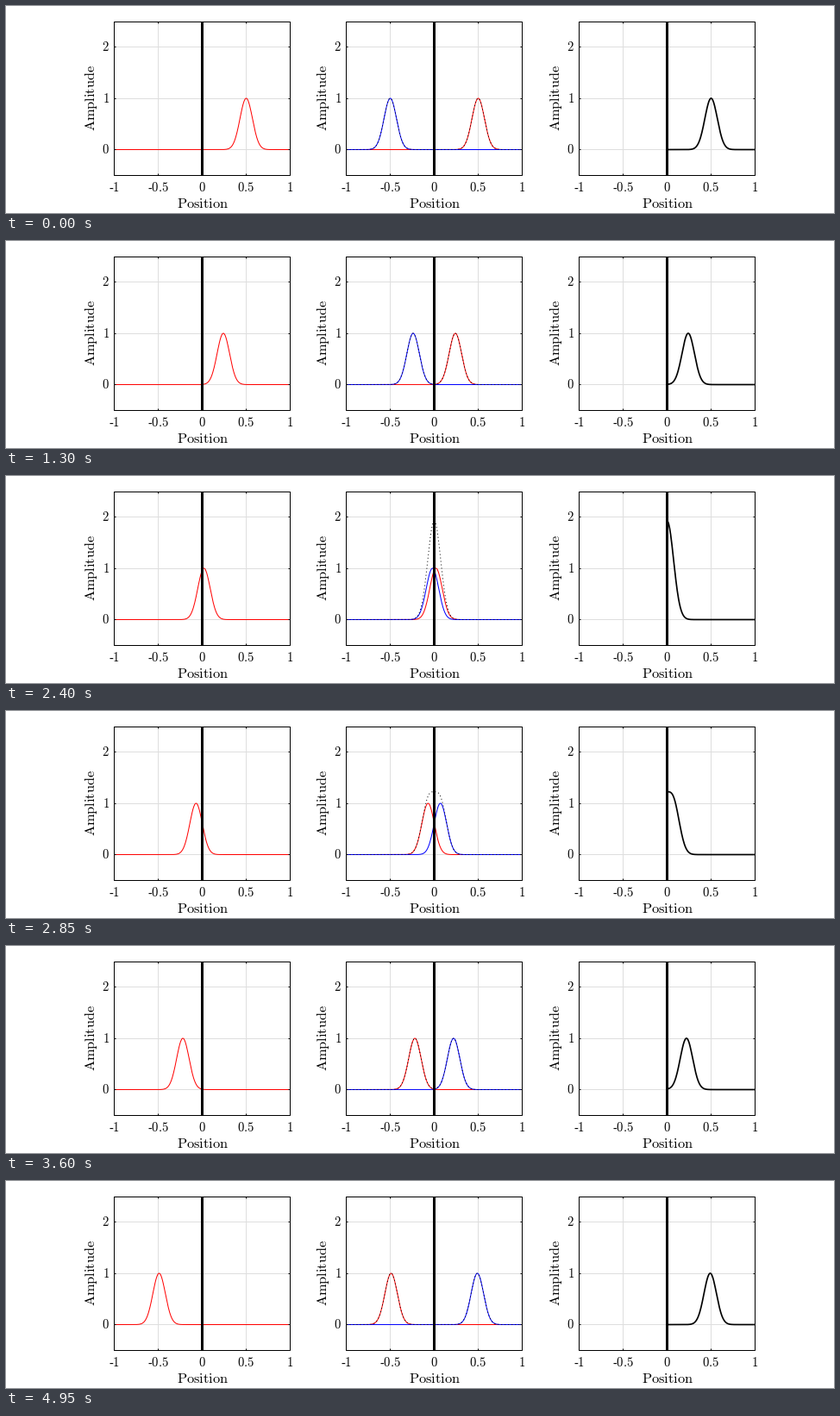
A matplotlib script for the animation above (5 s loop, 960 by 240 pixels).

```python
import numpy as np
import matplotlib.pyplot as plt
from matplotlib.animation import FuncAnimation
from matplotlib.patches import Rectangle

W, H, DPI = 960, 240, 100
FRAMES, INTERVAL = 100, 50
PX = 72 / DPI                      # points per pixel

CENTERS = (227.5, 496.5, 766.5)    # pixel column of x = 0 in each panel
HALF = 102                         # pixels per unit of position
TOP, BOTTOM = 18.5, 196.5
ZERO, UNIT = 166.5, 59.5           # pixel row of y = 0, pixels per unit
TICK = 2
GRID = "#dedede"

plt.rcParams.update({
    "font.family": "Liberation Serif",
    "mathtext.fontset": "cm",
    "path.snap": False,
    "lines.solid_capstyle": "butt",
    "lines.dash_capstyle": "butt",
})

fig = plt.figure(figsize=(W / DPI, H / DPI), dpi=DPI, facecolor="white")
ax = fig.add_axes([0, 0, 1, 1])
ax.set_xlim(0, W)
ax.set_ylim(H, 0)
ax.axis("off")


def line(xs, ys, color="black", width=1.0, z=2, **kw):
    return ax.plot(xs, ys, color=color, lw=width * PX, zorder=z, **kw)[0]


def roman(s):
    """Roman math type with a short hyphen as the sign."""
    sign = "-" if s.startswith("-") else ""
    return sign + r"$\mathrm{" + s.lstrip("-") + "}$"


def label(x, y, s, size, ha="center", **kw):
    ax.text(x, y, roman(s), fontsize=size * PX, ha=ha, va="baseline", **kw)


def to_y(v):
    return ZERO - UNIT * v


def draw_panel(cx):
    left, right = cx - HALF, cx + HALF
    for v in (-1, -0.5, 0, 0.5, 1):
        x = cx + HALF * v
        if abs(v) == 0.5:
            line([x, x], [TOP, BOTTOM], GRID, z=1)
        line([x, x], [BOTTOM, BOTTOM - TICK], z=6)
        line([x, x], [TOP, TOP + TICK], z=6)
        label(x, 215.3, f"{v:g}", 14.67)
    for v in (0, 1, 2):
        y = np.floor(to_y(v)) + 0.5
        line([left, right], [y, y], GRID, z=1)
        line([left, left + TICK], [y, y], z=6)
        line([right, right - TICK], [y, y], z=6)
        label(left - 5.5, y + 4.7, str(v), 14.67, ha="right")
    ax.add_patch(Rectangle((left, TOP), 2 * HALF, BOTTOM - TOP, fill=False,
                           ec="black", lw=PX, joinstyle="miter", zorder=6))
    line([cx, cx], [TOP - 0.5, BOTTOM + 0.5], width=3, z=5)
    label(cx + 0.5, 234, "Position", 16.3)
    label(left - 22.5, 106.5, "Amplitude", 16.3,
          rotation=90, rotation_mode="anchor")


for cx in CENTERS:
    draw_panel(cx)

pos = np.linspace(-1, 1, 401)
right_side = pos >= 0
cols = [cx + HALF * pos for cx in CENTERS]
flat = np.full_like(pos, ZERO)

single = line(cols[0], flat, "red")
incoming = line(cols[1], flat, "red")
mirrored = line(cols[1], flat, "blue", z=3)
total = line(cols[1], flat, z=4, linestyle=(0, (1, 3)))
visible = line(cols[2][right_side], flat[right_side], width=1.7)


def pulse(center):
    return np.exp(-((pos - center) / 0.1) ** 2)


def update(i):
    center = 0.5 - i / FRAMES
    a, b = pulse(center), pulse(-center)
    single.set_ydata(to_y(a))
    incoming.set_ydata(to_y(a))
    mirrored.set_ydata(to_y(b))
    total.set_ydata(to_y(a + b))
    visible.set_ydata(to_y(a + b)[right_side])
    return single, incoming, mirrored, total, visible


anim = FuncAnimation(fig, update, frames=FRAMES, interval=INTERVAL,
                     repeat=True, repeat_delay=0, blit=False)
plt.show()
```
